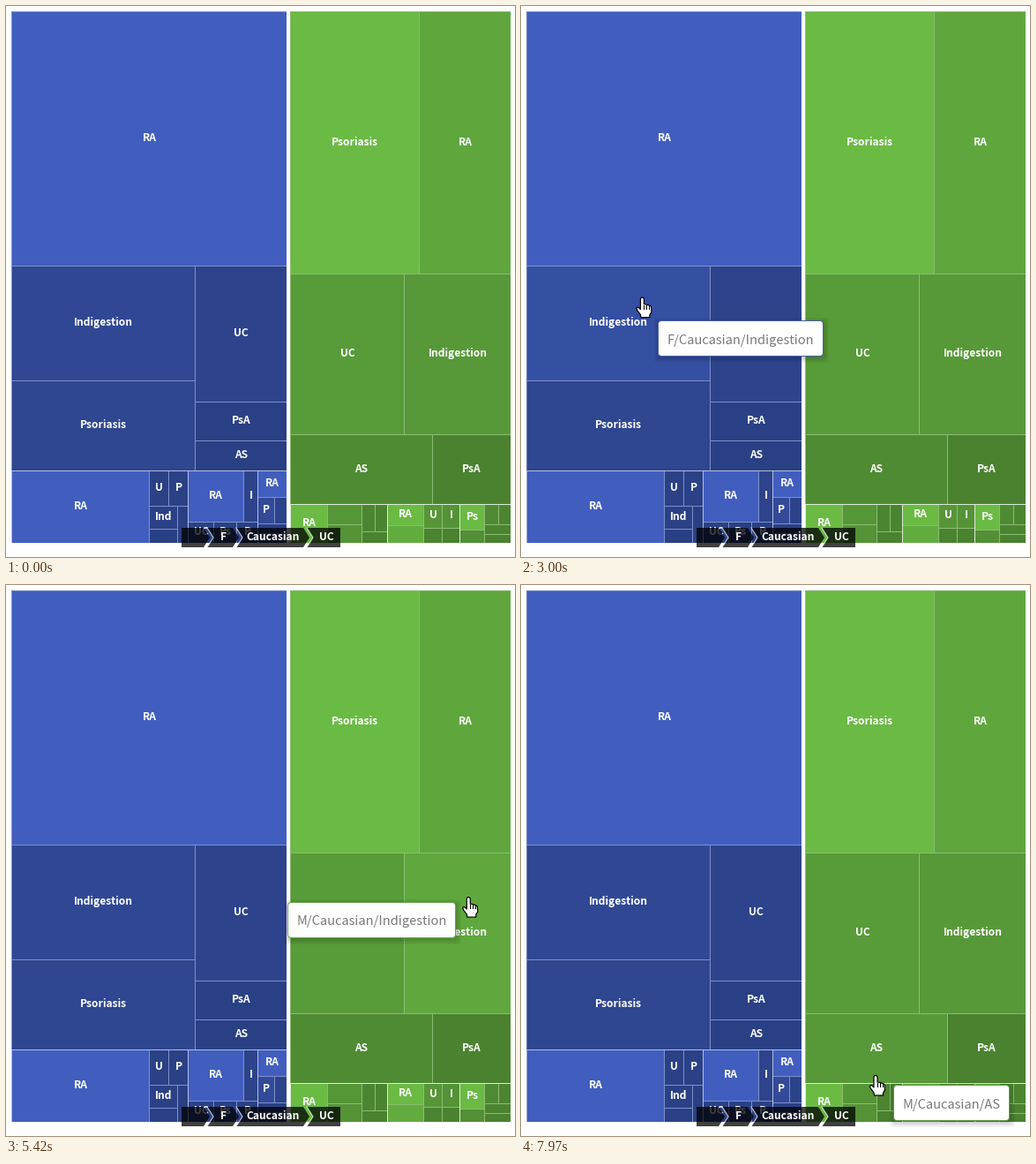
A matplotlib script that plays this animation: 577x624 px, repeating every 7990 ms.

```python
import numpy as np
import matplotlib.pyplot as plt
from matplotlib.animation import FuncAnimation
from matplotlib.colors import to_rgb
from matplotlib.patches import FancyBboxPatch, Polygon, Rectangle

W, H = 577, 624
FRAMES, INTERVAL = 235, 34
PX = 0.72  # points per pixel at 100 dpi
FONT = "Noto Sans CJK JP"
GOLDEN = (1 + 5 ** .5) / 2

# per sex: one (labels, values) pair for each ethnic group
FEMALE = [
    ("RA Indigestion Psoriasis UC PsA AS", (8986, 2704, 2122, 1602, 458, 354)),
    ("RA U P Ind", (1279, 88, 88, 83, 51, 50)),
    ("RA I UC Ps P", (365, 93, 70, 62, 58)),
    ("RA P", (99, 57, 42, 37, 36)),
]
MALE = [
    ("Psoriasis RA UC Indigestion AS PsA",
     (4336, 3089, 2348, 2202, 1272, 703)),
    ("RA", (185, 90, 82, 46, 43, 38)),
    ("RA  U I", (98, 82, 57, 54, 36, 34)),
    ("Ps", (81, 42, 37, 33, 32, 30)),
]

# pointer path: time, x, y
PATH = np.array([
    (790, 400, 640), (1580, 333, 535), (2040, 264, 487), (2390, 250, 470),
    (2850, 132, 345), (3000, 137, 332), (3450, 160, 215), (4000, 268, 190),
    (4750, 525, 204), (5200, 545, 300), (5620, 506, 400), (5940, 428, 410),
    (6030, 419, 509), (6400, 409, 533), (6700, 290, 480), (6900, 240, 468),
    (7400, 232, 485), (7800, 402, 555)])
TIP_LAG, TIP_GAP, TIP_HEIGHT = 60, 20, 41
HAND = np.array([
    (-2, 2), (-1, .5), (1, .5), (2, 2), (2, 8), (5, 8.5), (8, 9.5),
    (10, 10.5), (10.5, 17), (8.5, 20), (8.5, 23), (-1.5, 23),
    (-2, 20), (-6, 14.5), (-6.5, 12), (-4.5, 11.5), (-2, 14)])

fig = plt.figure(figsize=(W / 100, H / 100), dpi=100, facecolor="white")
ax = fig.add_axes([0, 0, 1, 1])
ax.set_xlim(0, W)
ax.set_ylim(H, 0)
ax.axis("off")


def worst_ratio(row, side):
    total, fixed = sum(row) ** 2, side * side * GOLDEN
    return max(fixed * max(row) / total, total / (fixed * min(row)))


def squarify(values, x, y, w, h):
    """Squarified treemap: one (x, y, w, h) box per value."""
    areas = [v * w * h / sum(values) for v in values]
    boxes = []
    while areas:
        side, n = min(w, h), 1
        while n < len(areas) and (worst_ratio(areas[:n + 1], side)
                                  < worst_ratio(areas[:n], side)):
            n += 1
        row, areas = areas[:n], areas[n:]
        depth, start = sum(row) / side, 0
        across = w <= h
        for area in row:
            length = area / depth
            boxes.append((x + start, y, length, depth) if across
                         else (x, y + start, depth, length))
            start += length
        if across:
            y, h = y + depth, h - depth
        else:
            x, w = x + depth, w - depth
    return boxes


def snap(box):
    x, y, w, h = box
    x0, y0 = round(x), round(y)
    return x0, y0, round(x + w) - x0, round(y + h) - y0


def mix(low, high, k):
    a, b = np.array(to_rgb(low)), np.array(to_rgb(high))
    return a + (b - a) * k


def line(xs, ys, color, width=1, **kw):
    return ax.plot(xs, ys, color=color, lw=width * PX, **kw)[0]


def rect(x, y, w, h, **kw):
    return ax.add_patch(Rectangle((x, y), w, h, **kw))


def label(x, y, s, z=3):
    ax.text(x, y, s, color="white", family=FONT, weight="bold",
            size=12 * PX, ha="center", va="baseline", zorder=z)


def add_treemap(groups, bounds, low, high, border, outline, sex):
    """Draw one side; return the cells of its first group."""
    first = []
    totals = [sum(values) for _, values in groups]
    for g, group_box in enumerate(squarify(totals, *bounds)):
        names, values = groups[g]
        names = names.split(" ") + [""] * len(values)
        for name, value, cell_box in zip(names, values,
                                         squarify(values, *group_box)):
            shade = (value - min(values)) / (max(values) - min(values))
            color = mix(low, high, shade)
            x, y, w, h = box = snap(cell_box)
            patch = rect(*box, fc=color, ec=border, lw=PX, zorder=1)
            label(x + w / 2 + .5, y + h / 2 + 3, name)
            if g == 0:
                first.append((patch, box, color, border, name, sex))
        if g:
            rect(*snap(group_box), fc="none", ec=outline, lw=PX, zorder=2)
    return first


hot_cells = add_treemap(FEMALE, (6, 6, 312, 602), "#2a4084", "#415ebf",
                        "#7f90c9", "#b0bce3", "F")
hot_cells += add_treemap(MALE, (322, 6, 250, 602), "#4a8230", "#6aba44",
                         "#8cbc74", "#dcecd4", "M")

# white margins and the gap between the sexes
for x0, x1 in ((0, 6), (318, 322), (572, W)):
    rect(x0, 0, x1 - x0, H, fc="white", lw=0, zorder=2.5)
for y0, y1 in ((0, 6), (608, H)):
    rect(0, y0, W, y1 - y0, fc="white", lw=0, zorder=2.5)
line([0.5, 0.5], [0, H], "#f0f0f0")
line([0, W], [615.5, 615.5], "#f0f0f0")


def breadcrumb(edges, names):
    top, mid, low, tip, gap = 591, 602, 613, 7, 4
    last = len(names) - 1
    for i, name in enumerate(names):
        left, right = edges[i], edges[i + 1]
        start = left + (gap if i else 0)
        notch = [(start + tip, mid)] if i else []
        point = [(right + tip, mid)] if i < last else []
        shape = ([(start, top), (right, top)] + point
                 + [(right, low), (start, low)] + notch)
        ax.add_patch(Polygon(shape, fc=(0, 0, 0, .75), lw=0, zorder=4))
        if i:
            line([start, start + tip, start], [top, mid, low], "white", 1.2,
                 alpha=.7, zorder=5)
        label((start + right + (tip if i else 0)) / 2, 605, name, 5)


breadcrumb((199, 224, 257, 337, 379), ("", "F", "Caucasian", "UC"))


def round_box(z, **kw):
    style = "round,pad=0,rounding_size=4"
    return ax.add_patch(FancyBboxPatch((0, 0), 10, 10, boxstyle=style,
                                       zorder=z, **kw))


shadows = [(grow, round_box(6, fc=(0, 0, 0, .045), lw=0))
           for grow in (0.5, 2, 3.5, 5)]
tip_box = round_box(7, fc="white", lw=PX)
tip_text = ax.text(0, 0, "", color="#7a7a7a", family=FONT, size=14.6 * PX,
                   va="baseline", zorder=8)
hand = ax.add_patch(Polygon(HAND, closed=True, fc="white", ec="black",
                            lw=1.2 * PX, joinstyle="round", zorder=10))
knuckles = [(x, line([], [], "black", 1, zorder=11)) for x in (2, 5, 8)]
tooltip = [tip_box, tip_text] + [s for _, s in shadows]
pointer = [hand] + [k for _, k in knuckles]


def pointer_at(t):
    return [np.interp(t, PATH[:, 0], PATH[:, k]) for k in (1, 2)]


def find_cell(px, py):
    for cell in hot_cells:
        x, y, w, h = cell[1]
        if x - 2 <= px <= x + w + 2 and y <= py < y + h:
            return cell
    return None


def place_tooltip(t, cell):
    """Trail the pointer; flip to its left side where the stage ends."""
    *_, border, name, sex = cell
    tip_text.set_text(f"{sex}/Caucasian/{name}")
    width = round(tip_text.get_window_extent().width) + 21
    px, py = pointer_at(t - TIP_LAG)
    x = round(px + TIP_GAP)
    if x + width > W:
        x = round(px - TIP_GAP - width)
    y = round(min(py + TIP_GAP, 607 - TIP_HEIGHT))
    tip_box.set_bounds(x + .5, y + .5, width - 1, TIP_HEIGHT - 1)
    tip_box.set_edgecolor(mix(border, cell[2], .7))
    for grow, shadow in shadows:
        shadow.set_bounds(x + 1 - grow, y + 2 - grow,
                          width + 2 * grow, TIP_HEIGHT + 2 * grow)
    tip_text.set_position((x + 10.5, y + 26.5))


def update(i):
    t = (i + .5) * INTERVAL
    px, py = pointer_at(t)
    visible = t >= PATH[0, 0]
    hovered = find_cell(px, py) if visible else None
    for cell in hot_cells:
        gain = 1.1 if cell is hovered else 1
        cell[0].set_facecolor(np.clip(cell[2] * gain, 0, 1))
    for artist in tooltip:
        artist.set_visible(hovered is not None)
    for artist in pointer:
        artist.set_visible(visible)
    if hovered:
        place_tooltip(t, hovered)
    hand.set_xy(HAND + (px, py))
    for dx, knuckle in knuckles:
        knuckle.set_data([px + dx, px + dx], [py + 9, py + 13])
    return tooltip + pointer


anim = FuncAnimation(fig, update, frames=FRAMES, interval=INTERVAL,
                     repeat=True, repeat_delay=0, blit=False)
plt.show()
```
